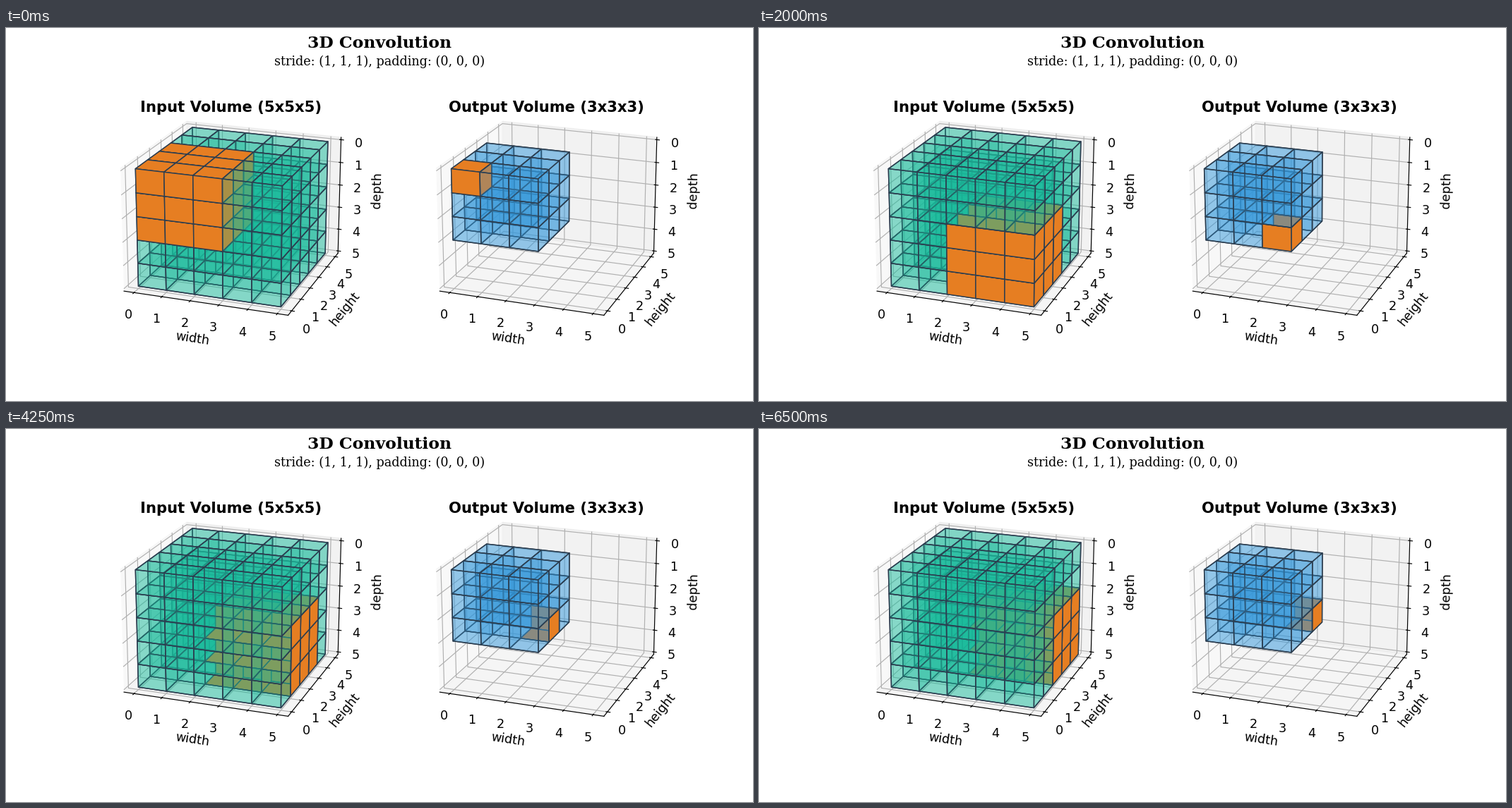
These frames come from a looping animation (1058 by 529 pixels, 6.75 s). A matplotlib script:

```python
from itertools import product

import matplotlib.pyplot as plt
from matplotlib.animation import FuncAnimation
from matplotlib.colors import to_rgba
from mpl_toolkits.mplot3d.art3d import Poly3DCollection

IN, KERNEL = 5, 3
OUT = IN - KERNEL + 1
ORANGE = to_rgba("#E67E22")
EDGE = "#2C3E50"

plt.rcParams.update({"font.family": "DejaVu Sans", "font.size": 12})


def cell_faces(cell):
    """Quads of one unit cell; a shared face belongs to the lower cell only."""
    faces = []
    for axis, side in product(range(3), range(2)):
        if side == 0 and cell[axis] > 0:
            continue
        u, v = [a for a in range(3) if a != axis]
        quad = []
        for i, j in ((0, 0), (1, 0), (1, 1), (0, 1)):
            point = list(cell)
            point[axis] += side
            point[u] += i
            point[v] += j
            quad.append(point)
        faces.append(quad)
    return faces


class Volume:
    def __init__(self, fig, slot, name, size, window, color):
        self.window = window
        self.color = to_rgba(color, 0.3)

        ax = fig.add_subplot(1, 2, slot, projection="3d")
        ax.view_init(elev=20, azim=-70)
        ax.set_title(f"{name} Volume ({size}x{size}x{size})",
                     fontsize=14.4, fontweight="bold", y=0.95)
        ax.set(xlabel="width", ylabel="height", zlabel="depth")

        self.cells = {}
        for cell in product(range(size), repeat=3):
            poly = Poly3DCollection(cell_faces(cell), facecolors=self.color,
                                    edgecolors=EDGE, linewidths=1.0)
            ax.add_collection3d(poly)
            self.cells[cell] = poly

        ticks = range(IN + 1)
        ax.set(xticks=ticks, yticks=ticks, zticks=ticks)
        side = 0.05 * IN + 1.1 * IN / 48
        ax.set_xlim(-side, IN + side)
        ax.set_ylim(-side, IN + side)
        ax.set_zlim(IN + IN / 48, -IN / 48)

    def highlight(self, origin):
        for cell, poly in self.cells.items():
            inside = all(o <= c < o + self.window for c, o in zip(cell, origin))
            poly.set_facecolor(ORANGE if inside else self.color)


fig = plt.figure(figsize=(10, 5), dpi=105.8)
fig.suptitle("3D Convolution", family="DejaVu Serif", fontsize=16, fontweight="bold")
fig.text(0.5, 0.9, "stride: (1, 1, 1), padding: (0, 0, 0)",
         family="DejaVu Serif", ha="center")

volumes = [
    Volume(fig, 1, "Input", IN, KERNEL, "#1ABC9C"),
    Volume(fig, 2, "Output", OUT, 1, "#3498DB"),
]


def update(step):
    h, rest = divmod(step, OUT * OUT)
    d, w = divmod(rest, OUT)
    for volume in volumes:
        volume.highlight((w, h, d))
    return [poly for volume in volumes for poly in volume.cells.values()]


anim = FuncAnimation(fig, update, frames=OUT ** 3, interval=250,
                     repeat=True, blit=False)
plt.show()
```
